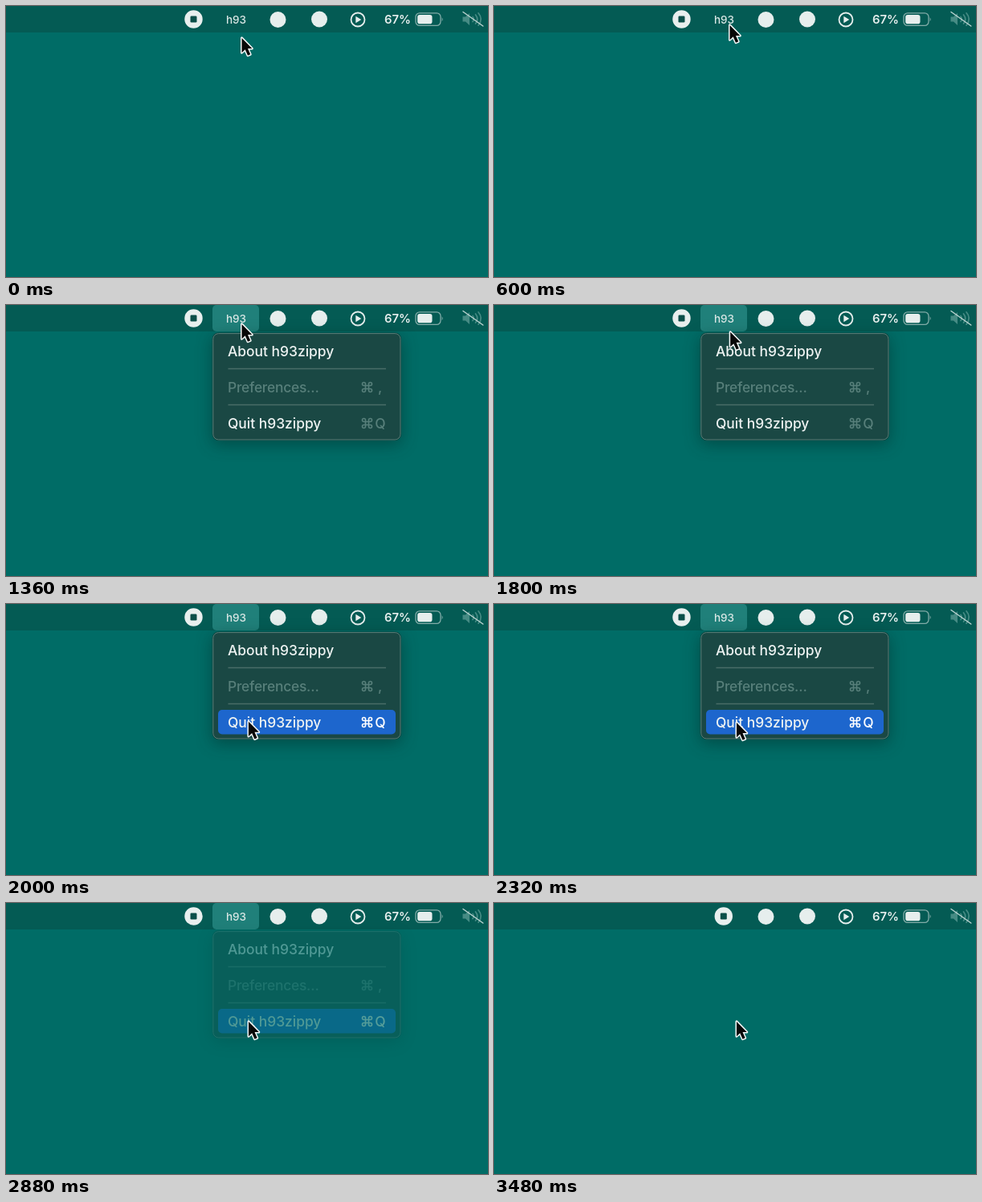
An HTML page that plays this animation: 600x338 px, repeating every 3520 ms.

```html
<!DOCTYPE html>
<html lang="en">
<head>
<meta charset="utf-8">
<title>Menu bar app</title>
<style>
html, body { margin: 0; width: 100%; height: 100%; overflow: hidden; background: #006c66; }
svg { display: block; width: 100vw; height: 100vh; }
text { font-family: Inter, "Open Sans", sans-serif; }
.row { font-size: 17.4px; font-weight: 550; fill: #eef3f2; }
.dim { fill: #577f7a; color: #577f7a; }
.lit { fill: #fff; color: #fff; }
.panel { filter: drop-shadow(0 5px 10px rgba(0, 30, 28, .42)); }
</style>
</head>
<body>
<svg viewBox="0 0 600 338" xmlns="http://www.w3.org/2000/svg">
  <defs>
    <path id="cmd" d="M5 5H3a2 2 0 1 1 2-2V11a2 2 0 1 1-2-2H11a2 2 0 1 1-2 2V3a2 2 0 1 1 2 2H5z"
      fill="none" stroke="currentColor" stroke-width="1.6"/>
  </defs>
  <rect width="600" height="338" fill="#006c66"/>
  <rect width="600" height="33" fill="#045b54"/>

  <g id="stop">
    <circle cy="16.5" r="11.2" fill="#e8efee"/>
    <rect x="-4" y="12.5" width="8" height="8" rx="1.3" fill="#0b4f49"/>
  </g>

  <g id="item">
    <rect id="press" x="257" y="0" width="58" height="33" rx="5" fill="#20807a"/>
    <text x="286.5" y="22" text-anchor="middle" font-size="13.5" font-weight="450" fill="#dbe8e6">h93</text>
  </g>

  <g fill="#e6eeed">
    <circle cx="338.5" cy="17" r="10"/>
    <circle cx="390" cy="16.5" r="10"/>
    <circle cx="438" cy="17" r="8.5" fill="none" stroke="#e6eeed" stroke-width="1.8"/>
    <path d="M435.3 12.8v8.4l7-4.2z"/>
    <text x="471" y="22" font-size="14.9" font-weight="620">67%</text>
    <rect x="510" y="8.8" width="31" height="15.6" rx="4.8" fill="none" stroke="#82aca8" stroke-width="1.3"/>
    <rect x="512.2" y="11" width="18.3" height="11.2" rx="2.8"/>
    <path d="M542.6 14.2q2.2 2.4 0 4.9z" fill="#82aca8"/>
  </g>
  <g fill="none" stroke="#468b84" stroke-width="1.7" stroke-linecap="round">
    <path d="M568.5 13.5h3.5l5-4.5v15l-5-4.5h-3.5z" fill="#468b84" stroke="none"/>
    <path d="M581 13.5q2.4 3 0 6M584.5 11q4.5 5.5 0 11M588 8.8q6.5 7.7 0 15.4"/>
    <path d="M569 7.5L593.8 25" stroke="#b9d2cf" stroke-width="1.5"/>
  </g>

  <g id="menu">
    <rect class="panel" x="256.7" y="34.5" width="235.4" height="134.6" rx="7.8" fill="#0a3f3a"/>
    <rect x="257.8" y="35.6" width="233.2" height="132.4" rx="6.8" fill="#1a4844" stroke="#5a7f79"/>
    <path d="M276.5 79.5H473M276.5 124.5H473" stroke="#486c67" stroke-width="1.5"/>
    <rect id="pick" x="264" width="221" height="30.5" rx="5" fill="#1d66cd"/>
    <text class="row" x="276" y="63.5">About h93zippy</text>
    <text class="row dim" x="276" y="108.7" letter-spacing="-.25">Preferences…</text>
    <g class="dim"><use href="#cmd" x="442.5" y="95.5"/></g>
    <text class="row dim" x="463" y="108.7">,</text>
    <text class="row" x="276" y="153.7">Quit h93zippy</text>
    <g id="keys" class="dim">
      <use href="#cmd" x="442.5" y="140.5"/>
      <text x="459.3" y="153.7" font-size="17.4" font-weight="550">Q</text>
    </g>
  </g>

  <path id="cursor" d="M1.5 3.2V21.5L5.7 17.6L9 25L12.2 23.6L9 16.3H14.3Z"
    fill="#080808" stroke="#f4f7f7" stroke-width="3" stroke-linejoin="round" paint-order="stroke"/>
</svg>
<script>
const LOOP = 3520, STEP = 40;
const OPEN = 680, BLINK = 2600, FADE = 2720, CLOSED = 2960, QUIT = 3080;
const el = id => document.getElementById(id);
const [stop, item, press, menu, pick, keys, cursor] =
  ['stop', 'item', 'press', 'menu', 'pick', 'keys', 'cursor'].map(el);

// Eased progress from 0 to 1 between two times
const ease = (t, from, to) => {
  const p = Math.min(1, Math.max(0, (t - from) / (to - from)));
  return p * p * (3 - 2 * p);
};
const show = (node, on) => node.setAttribute('visibility', on ? 'visible' : 'hidden');
const move = (node, x, y) => node.setAttribute('transform', `translate(${x} ${y})`);

function draw(t) {
  const down = ease(t, 1755, 2015);
  const x = 292 + 8.5 * down;
  const y = 36.7 - 16 * ease(t, 200, 560) + 124 * down;
  move(cursor, x, y);

  const open = t >= OPEN && t < CLOSED;
  show(menu, open);
  show(press, open);
  menu.setAttribute('opacity', t < FADE ? 1 : Math.max(0, (CLOSED - t) / (CLOSED - FADE)));

  const blink = t >= BLINK && t < FADE - STEP;
  const about = y > 42 && y < 72;
  const quit = y >= 132 && !blink;
  pick.setAttribute('y', about ? 42 : 132);
  pick.setAttribute('display', open && (about || quit) ? 'inline' : 'none');
  keys.setAttribute('class', quit ? 'lit' : 'dim');

  show(item, t < QUIT);
  move(stop, 233.5 + 52.3 * ease(t, QUIT, QUIT + 160), 0);
}

function tick(now) {
  draw(Math.floor((now % LOOP) / STEP) * STEP);
  requestAnimationFrame(tick);
}
draw(0);
requestAnimationFrame(tick);
</script>
</body>
</html>
```
